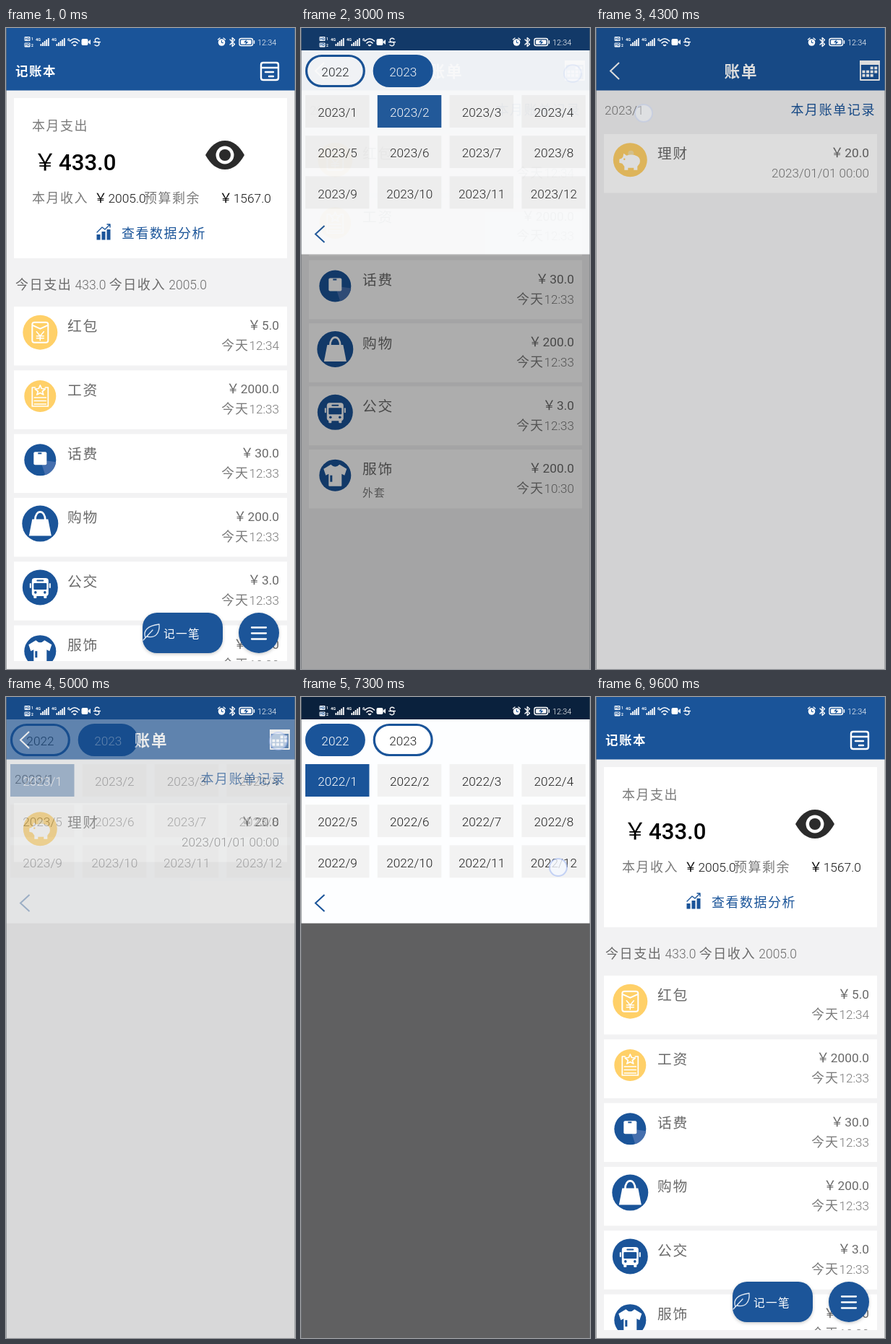
Recreate the animation shown at these times as an HTML page. Size 400 by 888 pixels, loop 10000 ms.

```html
<!DOCTYPE html>
<html lang="zh-CN">
<head>
<meta charset="utf-8">
<title>记账本</title>
<style>
html, body { margin: 0; width: 100%; height: 100%; overflow: hidden; background: #f2f2f3; }
svg { display: block; width: 400px; height: 888px; }
text { font-family: "Noto Sans CJK SC", "Noto Sans SC", "Noto Sans CJK JP", "Noto Sans", sans-serif; white-space: pre; }
.latin { font-family: Roboto, "Noto Sans", sans-serif; }
.line { fill: none; stroke: #fff; stroke-width: 2; stroke-linecap: round; stroke-linejoin: round; }
</style>
</head>
<body>
<svg id="stage" viewBox="0 0 400 888" xmlns="http://www.w3.org/2000/svg"></svg>
<script>
const BLUE = '#1a5499', YELLOW = '#ffd068', BG = '#f2f2f3', GREY = '#7a7a7a';
const LOOP = 10000, STEP = 100;

const rect = (x, y, w, h, fill, rx = 0, more = '') =>
  `<rect x="${x}" y="${y}" width="${w}" height="${h}" rx="${rx}" fill="${fill}" ${more}/>`;
const disc = (x, y, r, fill) => `<circle cx="${x}" cy="${y}" r="${r}" fill="${fill}"/>`;
const line = (d, style = '') => `<path class="line" d="${d}" style="${style}"/>`;
const shape = (d, fill = '#fff') => `<path d="${d}" fill="${fill}"/>`;
const group = (id, body) => `<g id="${id}">${body}</g>`;

// Chinese runs are airy, Latin runs a little smaller; y is the middle of the line.
function txt(x, y, s, size, fill = GREY, anchor = 'start', weight = 300) {
  const runs = s.match(/[\x20-\x7e]+|[^\x20-\x7e]+/g).map(run => run.charCodeAt(0) < 127
    ? `<tspan class="latin" font-size="${size * 0.89}">${run}</tspan>`
    : `<tspan font-size="${size * 0.92}" letter-spacing="${size * 0.08}">${run}</tspan>`).join('');
  return `<text x="${x}" y="${(y + size * 0.34).toFixed(2)}" fill="${fill}" text-anchor="${anchor}" font-weight="${weight}">${runs}</text>`;
}

// Category icons, drawn around 0,0.
const icons = {
  红包: disc(0, 0, 24, YELLOW) + line('M-8 -14H8Q11 -14 11 -11V11Q11 14 8 14H-8Q-11 14 -11 11V-11Q-11 -14 -8 -14ZM-11 -10L0 -5L11 -10') +
    line('M-5 -1L0 5L5 -1M0 5V11M-5 5H5M-5 8H5', 'stroke-width:1.5'),
  工资: disc(0, 0, 22, YELLOW) +
    line('M-7 -12H-11V14H11V-12H7M-8 2H8M-8 6.5H8M-8 11H8M0 -15L2 -10.5L7 -10L3 -6.5L4.5 -2L0 -4.5L-4.5 -2L-3 -6.5L-7 -10L-2 -10.5Z', 'stroke-width:1.7'),
  话费: disc(0, 0, 22, BLUE) + shape('M0 0L22 3A22 22 0 0 1 7 21Z', '#456fae') + rect(-9, -11, 18, 18, '#fff', 2) + rect(-3, -10, 5, 2, BLUE),
  购物: disc(0, 0, 25, BLUE) + shape('M-11 -6H11L15.500 17H-15.500Z') + line('M-7 -5C-7 -20 7 -20 7 -5', 'stroke-width:2.6'),
  公交: disc(0, 0, 24.5, BLUE) + rect(-11.5, -13, 23, 25, '#fff', 4) + rect(-9, -6, 18, 9, BLUE, 1) + rect(-5, -10.5, 10, 2, BLUE, 1) +
    disc(-6.5, 7, 1.8, BLUE) + disc(6.5, 7, 1.8, BLUE) + rect(-9, 11, 4, 4, '#fff', 1) + rect(5, 11, 4, 4, '#fff', 1) +
    rect(-14.5, -6, 2, 7, '#fff', 1) + rect(12.5, -6, 2, 7, '#fff', 1),
  服饰: disc(0, 0, 22, BLUE) + shape('M-6 -15Q0 -9 6 -15L16 -9L13 0L9 -2V14Q9 15 8 15H-8Q-9 15 -9 14V-2L-13 0L-16 -9Z') + rect(-7, 0, 3, 9, BLUE),
  理财: disc(0, 0, 23.5, YELLOW) + disc(1, -9, 4, '#f3dca0') +
    shape('M-10 -4L-9 -9L-5 -6Q3 -9 10 -5Q15 -2 13 5L10 9V14H5V11H-3V14H-8V9L-11 5L-15 4V-1L-12 -2Z') + disc(-8, -1, 1.2, YELLOW)
};

function row(y, [name, amount, when, note]) {
  return rect(11, y, 378, 81.5, '#fff') +
    `<g transform="translate(47.300 ${y + 35.7})">${icons[name]}</g>` +
    txt(85, y + 27, name, 21.5, '#6a6a6a', 'start', 400) +
    txt(378, y + 25.5, '￥' + amount, 19.5, '#6a6a6a', 'end', 400) +
    txt(378, y + 53.5, when, 19.2, GREY, 'end') +
    (note ? txt(85, y + 60, note, 16) : '');
}
const list = (y, gap, rows) => rows.map((r, i) => row(y + gap * i, r)).join('');

const recent = [
  ['红包', '5.0', '今天12:34'], ['工资', '2000.0', '今天12:33'], ['话费', '30.0', '今天12:33'],
  ['购物', '200.0', '今天12:33'], ['公交', '3.0', '今天12:33'], ['服饰', '200.0', '今天10:30', '外套']
];
const bills = {
  '2023/2': recent,
  '2023/1': [['理财', '20.0', '2023/01/01 00:00']],
  '2022/12': [['红包', '5.0', '2022/12/01 00:00']]
};

const base = rect(0, 0, 400, 888, BG) + rect(0, 0, 400, 86.5, BLUE);

const home = base +
  txt(13, 60, '记账本', 19, '#fff', 'start', 700) +
  line('M356 48H374Q377 48 377 51V69Q377 72 374 72H356Q353 72 353 69V51Q353 48 356 48ZM354 55H376M359 61H370M364 67H370', 'stroke-width:2.4') +
  rect(11, 97, 378, 222, '#fff') +
  txt(36, 135, '本月支出', 19.5) +
  txt(38, 185, '￥433.0', 35, '#000', 'start', 500) +
  shape('M276 176C283 163 292 156 303 156S323 163 330 176C323 189 314 196 303 196S283 189 276 176Z', '#2b2b2b') +
  disc(303, 176, 12.5, '#fff') + disc(303, 176, 8, '#2b2b2b') +
  txt(36, 235, '本月收入', 19.5) + txt(122, 235, '￥2005.0', 19.5, '#111') +
  txt(191, 235, '预算剩余', 19.5) + txt(367, 235, '￥1567.0', 19.5, '#111', 'end') +
  rect(125.500, 286, 5, 7.5, BLUE) + rect(132.500, 282, 5, 11.5, BLUE) + rect(139.500, 279, 5, 14.5, BLUE) +
  line('M126 283L133 276L137 279L144 272M140 272H144V276', `stroke:${BLUE};stroke-width:1.4`) +
  txt(160, 284, '查看数据分析', 19.5, BLUE) +
  txt(13, 355, '今日支出 433.0 今日收入 2005.0', 19.6, '#6a6a6a') +
  `<g clip-path="url(#list)">${list(386, 88.3, recent)}</g>` +
  `<g filter="url(#shadow)">${rect(189, 810, 111, 56, BLUE, 20)}${disc(350, 838, 28, BLUE)}</g>` +
  line('M190 848L203 834M193 845C189 835 196 828 212 826C213 838 207 846 195 843', 'stroke-width:1.3;stroke:#dfe8f3') +
  txt(218, 839, '记一笔', 17, '#fff', 'start', 400) +
  line('M340 830.500H360M340 838.500H360M340 846.500H360', 'stroke-width:2.3');

// The first slot of the calendar grid stays empty.
let days = '';
for (let i = 2; i < 12; i++) {
  const col = i % 4, week = Math.floor(i / 4);
  if (week < 2 || col < 3) days += rect(368.5 + col * 5.6, 53.5 + week * 5.2, 4, 3.8, '#fff');
}
const billHead = base +
  line('M32 48L20 59.500L32 71', 'stroke-linecap:butt;stroke-linejoin:miter') +
  txt(201, 60, '账单', 23.5, '#fff', 'middle', 700) +
  line('M366 46H392V72H366Z', 'stroke-width:1.8') + rect(365, 45, 28, 6, '#fff') + days +
  txt(387, 113, '本月账单记录', 19.6, BLUE, 'end');

const billBody = month => txt(12, 113, month, 19.2) + list(147, 87.4, bills[month]);

function picker(year, chosen) {
  let out = rect(0, 31, 400, 282.5, '#fdfeff');
  [2022, 2023].forEach((y, i) => {
    const on = y === year, x = 7.5 + i * 93.8;
    out += rect(x, 38.5, 79.8, 42, on ? BLUE : '#fff', 21, `stroke="${BLUE}" stroke-width="3.2"`) +
      txt(x + 40, 60, String(y), 19.4, on ? '#fff' : '#222', 'middle');
  });
  for (let m = 1; m <= 12; m++) {
    const x = 6 + (m - 1) % 4 * 99.8, y = 93 + Math.floor((m - 1) / 4) * 56.2, on = m === chosen;
    out += rect(x, y, 88.5, 45, on ? BLUE : '#f2f2f2') +
      txt(x + 44.5, y + 23.5, year + '/' + m, 19.4, on ? '#fff' : '#222', 'middle');
  }
  return out + line('M32.500 274L20 285.500L32.500 297', `stroke:${BLUE};stroke-linecap:butt;stroke-linejoin:miter`);
}

function signal(x) {
  let out = txt(x, 16, '4G', 6.4, '#fff', 'start', 700);
  for (let i = 0; i < 5; i++) out += rect(x + 6.5 + i * 2.6, 22 - i * 2, 1.8, 3 + i * 2, '#fff');
  return out;
}
const status =
  [12, 20.5].map((y, i) => rect(25.5, y, 8, 6, '#fff', 1) + txt(29.5, y + 3.1, 'HD', 5.4, BLUE, 'middle', 700) +
    txt(35, y + 3.2, String(i + 1), 5.6, '#fff', 'start', 700)).join('') +
  signal(41) + signal(63) + txt(85, 16, '6', 7, '#fff', 'start', 700) +
  line('M88.500 18Q95 11.500 101.500 18M91 21Q95 17 99 21M93.500 23.500L95 24.500L96.500 23.500', 'stroke-width:1.6') +
  rect(104.500, 15, 9, 9, '#fff', 2) + shape('M113 19.500L117 16V23Z') +
  line('M129 15.500Q126 13 123.500 15.500Q122.500 19 126 19.500Q130 20 128.500 23.500Q126 26 123 23.500M121.500 19.500H130.500', 'stroke-width:1.3') +
  disc(298.500, 20, 4.8, '#fff') + line('M293.500 16L296 14M303.500 16L301 14', 'stroke-width:1.3') +
  line('M298.500 17.500V20.500H300.500', `stroke:${BLUE};stroke-width:1`) +
  line('M310 16L316.500 22.500L313.200 25.500V13.500L316.500 16.500L310 23', 'stroke-width:1.4') +
  rect(323, 14.500, 18.500, 10, 'none', 2.5, 'stroke="#fff" stroke-width="1.4"') + rect(325, 16.500, 14.500, 6, '#fff', 1) +
  shape('M333 16L329 20H332L331 23.500L335.500 19H332.500Z', BLUE) + rect(342.800, 17, 1.4, 5, '#fff', 0.7) +
  txt(348, 19.700, '12:34', 12.2, '#fff');

const stage = document.getElementById('stage');
stage.innerHTML = `<defs>
  <clipPath id="list"><rect x="0" y="386" width="400" height="491"/></clipPath>
  <filter id="shadow" x="-20%" y="-30%" width="140%" height="180%"><feDropShadow dx="0" dy="1.5" stdDeviation="2" flood-opacity=".22"/></filter>
</defs>` +
  group('home', home) + group('bill', billHead + group('body', '')) +
  rect(0, 0, 400, 888, '#000', 0, 'id="dim"') + group('picker', '') + group('status', status) +
  rect(0, 0, 1, 888, '#6e7378', 0, 'opacity=".6"') + rect(399, 0, 1, 888, '#6e7378', 0, 'opacity=".45"') +
  `<path id="edge" fill="#505052"/><path id="arrow" class="line"/>` +
  `<circle id="dot" r="12" fill="#f5f9ff" fill-opacity=".78" stroke="#a9bff2" stroke-opacity=".65" stroke-width="2"/>`;

const el = {};
for (const id of ['home', 'bill', 'body', 'dim', 'picker', 'edge', 'arrow', 'dot']) el[id] = document.getElementById(id);

const ramp = (t, a, b) => Math.min(1, Math.max(0, (t - a) / (b - a)));
const ease = p => 1 - (1 - p) ** 3;
const shift = (node, x) => node.setAttribute('transform', `translate(${x.toFixed(1)} 0)`);
const alpha = (node, a) => {
  node.setAttribute('opacity', a.toFixed(3));
  node.setAttribute('display', a > 0 ? 'inline' : 'none');
};

// from, to, x, y
const taps = [
  [600, 900, 365, 60], [2600, 3060, 376, 63], [3800, 4390, 66, 118],
  [4800, 5150, 377, 61], [5500, 5890, 47, 67], [7300, 7650, 356, 236], [8500, 8800, 353, 657]
];
// shown from, shown by, hidden from, hidden by
const sheets = [[2850, 3130, 4060, 4370], [4950, 5230, 7460, 7770]];

const shown = {};
function fill(node, key, make) {
  if (shown[node.id] === key) return;
  shown[node.id] = key;
  node.innerHTML = make();
}

function draw(t) {
  const k = ease(ramp(t, 800, 1250)) - ease(ramp(t, 8700, 9080));
  shift(el.home, -100 * k);
  shift(el.bill, 400 * (1 - k));
  el.bill.setAttribute('display', k > 0 ? 'inline' : 'none');

  const month = t < 4060 ? '2023/2' : t < 7460 ? '2023/1' : '2022/12';
  fill(el.body, month, () => billBody(month));
  const year = t < 5700 ? 2023 : 2022, chosen = t < 4250 ? 2 : 1;
  fill(el.picker, year + '/' + chosen, () => picker(year, chosen));

  let dim = 0, sheet = 0;
  for (const [a, b, c, d] of sheets) {
    dim += ramp(t, a, b) - ramp(t, c, d);
    sheet += ramp(t, a, a + 160) - ramp(t, c, c + 180);
  }
  alpha(el.dim, 0.6 * dim);
  alpha(el.picker, sheet);

  const tap = taps.find(([a, b]) => t >= a && t < b);
  alpha(el.dot, tap ? ramp(t, tap[1], tap[1] - 200) : 0);
  if (tap) {
    el.dot.setAttribute('cx', tap[2] - (tap[3] > 600 ? ramp(t, 8500, 8700) * 70 : 0));
    el.dot.setAttribute('cy', tap[3]);
  }

  // Dark bulge of the back gesture on the right edge.
  const pull = t < 8500 ? 0 : 5 + 20 * ramp(t, 8500, 8650) - 25 * ramp(t, 8700, 8850);
  const x = 400 - pull;
  alpha(el.edge, pull > 0 ? 1 : 0);
  alpha(el.arrow, pull > 12 ? 1 : 0);
  el.edge.setAttribute('d', `M400 530C400 562 ${x} 566 ${x} 592S400 622 400 656Z`);
  el.arrow.setAttribute('d', `M${x + 13} 586L${x + 7} 592L${x + 13} 598`);
}

const start = performance.now();
function tick() {
  const t = (performance.now() - start) % LOOP;
  draw(Math.floor(t / STEP) * STEP);
  requestAnimationFrame(tick);
}
tick();
</script>
</body>
</html>
```
